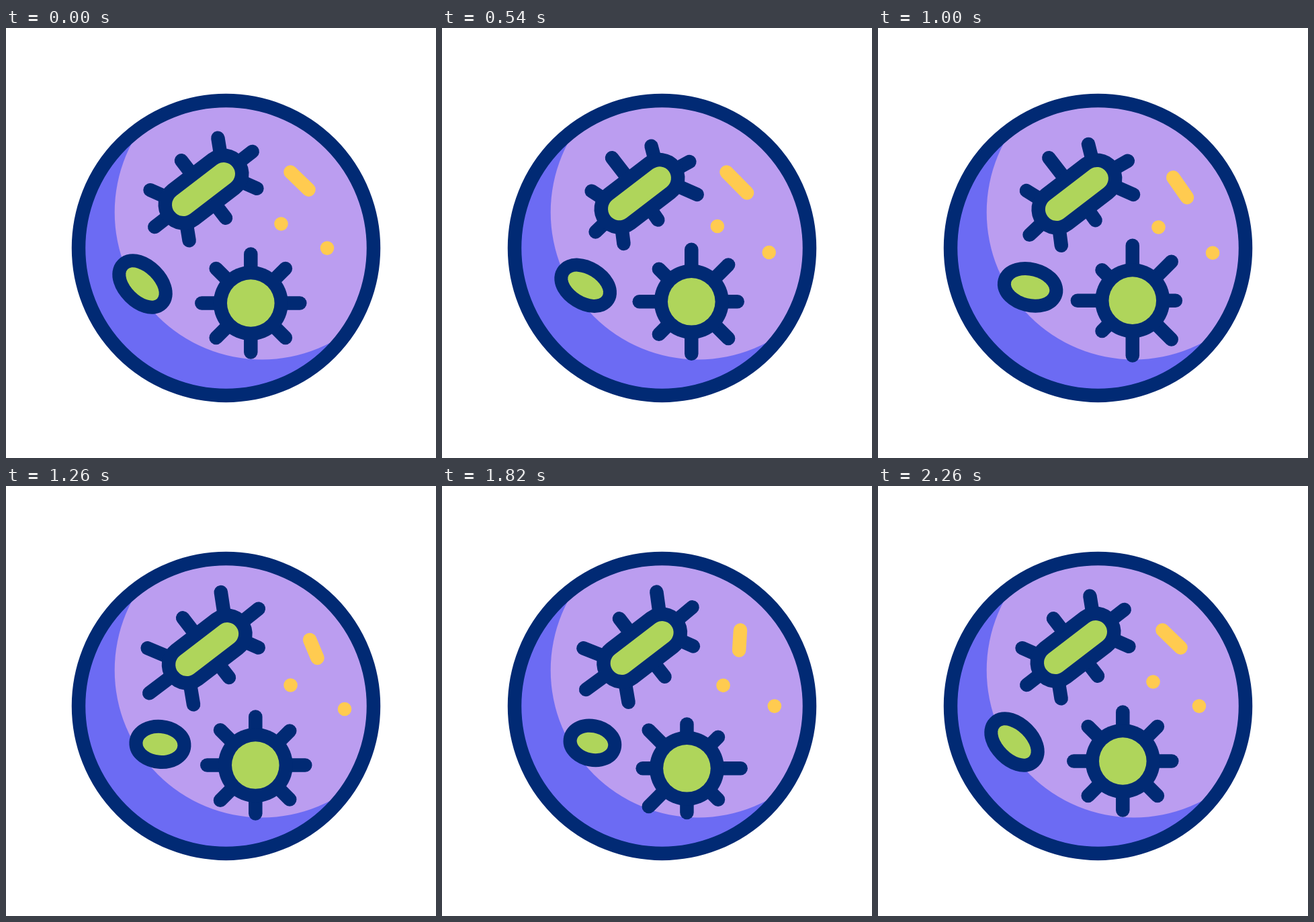
An HTML page with a canvas for the animation above (2.4 s loop, 640x640 px).

```html
<!DOCTYPE html>
<html lang="en">
<head>
<meta charset="utf-8">
<title>Petri dish</title>
<style>
html, body { margin: 0; width: 100%; height: 100%; overflow: hidden; background: #fff; }
canvas { display: block; width: 100vw; height: 100vh; object-fit: contain; }
</style>
</head>
<body>
<canvas id="stage" width="640" height="640"></canvas>
<script>
const ctx = document.getElementById('stage').getContext('2d');
const LOOP = 2400, BEGIN = 220, END = 2260, LINE = 20.5, TAU = 2 * Math.PI;
const NAVY = '#012a74', LILAC = '#bb9df0', BLUE = '#6c6bf3', GREEN = '#afd55b', YELLOW = '#ffcb50';

const sine = u => (1 - Math.cos(Math.PI * u)) / 2;
const linear = u => u;
const evenly = n => Array.from({ length: n + 1 }, (_, i) => BEGIN + (END - BEGIN) * i / n);

// Eases through the poses and back to the first one.
function track(poses, times = evenly(poses.length), ease = sine) {
  return t => {
    if (t <= BEGIN || t >= END) return poses[0];
    let i = 0;
    while (t >= times[i + 1]) i++;
    const e = ease((t - times[i]) / (times[i + 1] - times[i]));
    const next = poses[(i + 1) % poses.length];
    return poses[i].map((v, k) => v + (next[k] - v) * e);
  };
}

// Round cell: centre and spike swing; spikes grow or shrink in opposition
const cell = track([[364.3, 409.5, 0], [379.6, 404.6, 1], [364.5, 424.5, -1]]);
const cellSign = [1, 1, -1, 1, 1, -1, 1, -1];

// Rod: centre and the weights of its two spike stretches
const rod = track([[294, 240, 0, 0], [294, 249.2, 1, 0], [300.3, 241.7, 0, 1]],
  [BEGIN, 735, 1460, END]);
const stretchA = [-7, -5, 10, -9, -3, -7, -7, 19];
const stretchB = [12, 8, -6, 1, 8, 21, 13, 2];
const lean = [-8, 13, 0, 4, 3, -9, 13, 0];

// Oval: centre, long half-axis, short half-axis
const oval = track([
  [203, 381, 21.9, 21.9, -11.5, 11.5],
  [226.3, 386, 28.7, 7.8, -4.5, 16.3],
  [232, 383, 23.8, -2.5, 2, 16.6]
]);

// Pill: both ends
const pill = track([
  [423.5, 214.5, 450.5, 240.7],
  [423.5, 214.5, 455.6, 247.6],
  [452.2, 229, 463.6, 256],
  [445, 214.6, 441.7, 244.7]
]);
const dotA = track([[409.5, 291.5], [410, 296.5], [423.6, 296.5], [419, 297.1]]);
const dotB = track([[478, 327.6], [491.6, 337.6], [504, 332], [502.6, 327.6]],
  [BEGIN, 720, 1260, 1620, END], linear);

function disc(x, y, r, color) {
  ctx.beginPath();
  ctx.arc(x, y, r, 0, TAU);
  ctx.fillStyle = color;
  ctx.fill();
}

function bar(x1, y1, x2, y2, width, color) {
  ctx.beginPath();
  ctx.moveTo(x1, y1);
  ctx.lineTo(x2, y2);
  ctx.lineWidth = width;
  ctx.strokeStyle = color;
  ctx.stroke();
}

function spike(x, y, degrees, length) {
  const a = degrees * TAU / 360;
  bar(x, y, x + length * Math.cos(a), y + length * Math.sin(a), LINE, NAVY);
}

function dish() {
  const c = 327.5;
  ctx.save();
  ctx.beginPath();
  ctx.arc(c, c, 219, 0, TAU);
  ctx.clip();
  disc(c, c, 220, BLUE);
  disc(381, 274.2, 219.3, LILAC);
  ctx.restore();
  ctx.beginPath();
  ctx.arc(c, c, 219.5, 0, TAU);
  ctx.lineWidth = LINE;
  ctx.strokeStyle = NAVY;
  ctx.stroke();
}

function drawCell(t) {
  const [x, y, swing] = cell(t);
  cellSign.forEach((s, i) => spike(x, y, i * 45 - 90, 73 + 10 * s * swing));
  disc(x, y, 55.5, NAVY);
  disc(x, y, 35.3, GREEN);
}

function drawRod(t) {
  const [x, y, a, b] = rod(t);
  const dx = 30, dy = -23, axis = -37.7;
  // Three spikes fan out from each cap, one from each long side.
  for (let i = 0; i < 8; i++) {
    const half = i < 4 ? 1 : -1, k = i % 4;
    const cap = k < 3 ? half : 0;
    const turn = k < 3 ? (k - 1) * 61.5 : 90;
    const angle = axis + turn + (half < 0 ? 180 : 0) + lean[i] * (a - 0.3 * b);
    spike(x + cap * dx, y + cap * dy, angle, 54 + stretchA[i] * a + stretchB[i] * b);
  }
  bar(x - dx, y - dy, x + dx, y + dy, 34 + 2 * LINE, NAVY);
  bar(x - dx, y - dy, x + dx, y + dy, 34, GREEN);
}

function drawOval(t) {
  const [x, y, ax, ay, bx, by] = oval(t);
  ctx.save();
  ctx.transform(ax, ay, bx, by, x, y);
  ctx.beginPath();
  ctx.arc(0, 0, 1, 0, TAU);
  ctx.restore();
  ctx.lineWidth = 2 * LINE - 1;
  ctx.strokeStyle = NAVY;
  ctx.stroke();
  ctx.fillStyle = GREEN;
  ctx.fill();
}

function draw(t) {
  ctx.fillStyle = '#fff';
  ctx.fillRect(0, 0, 640, 640);
  ctx.lineCap = 'round';
  dish();
  drawRod(t);
  drawCell(t);
  drawOval(t);
  bar(...pill(t), LINE, YELLOW);
  disc(...dotA(t), 10.3, YELLOW);
  disc(...dotB(t), 10.3, YELLOW);
}

const start = performance.now();
function tick() {
  draw((performance.now() - start) % LOOP);
  requestAnimationFrame(tick);
}
tick();
</script>
</body>
</html>
```
